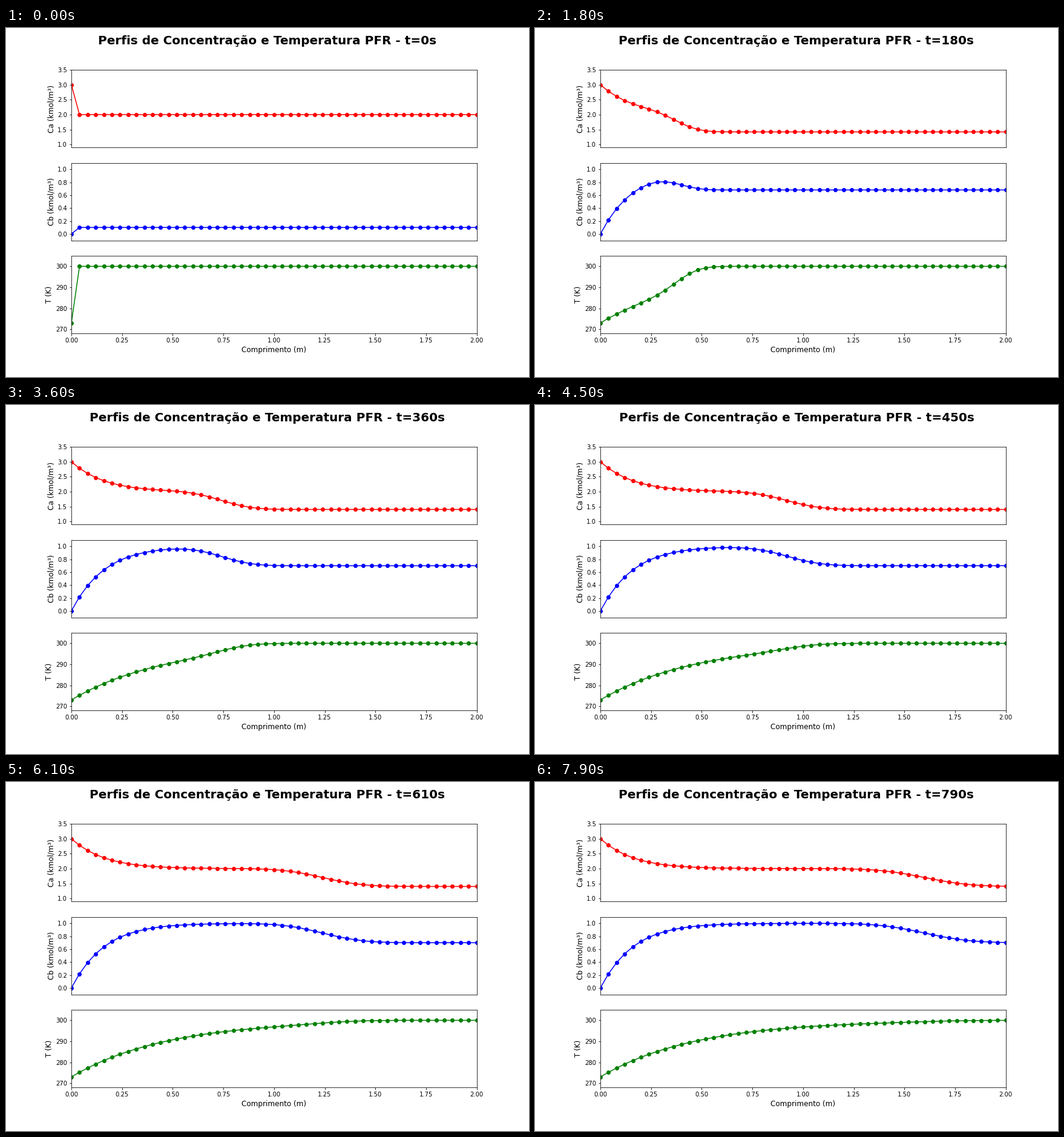
Write a matplotlib script that moves like this. It is 864x576 px and loops after 8000 ms.

```python
import numpy as np
import matplotlib.pyplot as plt
from matplotlib.animation import FuncAnimation

plt.rcParams["font.family"] = "DejaVu Sans"

FRAMES, DT = 80, 10      # one frame per time step of 10 s
NODES, LENGTH = 51, 2.0
COURANT = 0.5            # v * dt / dx
JACKET_T = 300.0
KEEP, CARRY = 0.47, 0.4866   # per-step weights of the excess temperature
RATE, ACT = 0.1735, 720.0    # kinetics at 300 K and E/R


def upwind(c):
    return COURANT * (c[:-1] - c[1:])


def step(ca, cb, temp):
    """Advance the reversible reaction A <-> B by one explicit step."""
    k = RATE * np.exp(ACT * (1 / JACKET_T - 1 / temp[1:]))
    r = k * (ca[1:] - 2 * cb[1:]) / 3
    heat = temp - JACKET_T
    na, nb, nt = ca.copy(), cb.copy(), temp.copy()
    na[1:] += upwind(ca) - r
    nb[1:] += upwind(cb) + r
    nt[1:] = JACKET_T + KEEP * heat[1:] + CARRY * heat[:-1]
    return na, nb, nt


def simulate():
    state = tuple(np.full(NODES, v) for v in (2.0, 0.1, JACKET_T))
    for profile, inlet in zip(state, (3.0, 0.0, 273.0)):
        profile[0] = inlet
    states = [state]
    for _ in range(FRAMES - 1):
        states.append(step(*states[-1]))
    return states


states = simulate()
x = np.linspace(0, LENGTH, NODES)

fig, axes = plt.subplots(3, 1, figsize=(12, 8), dpi=72)
fig.subplots_adjust(left=0.125, right=0.9, bottom=0.125, top=0.88, hspace=0.2)
title = fig.suptitle("", fontsize=20, fontweight="bold")

panels = [
    ("Ca (kmol/m³)", "r", (0.9, 3.5), np.arange(1, 3.6, 0.5)),
    ("Cb (kmol/m³)", "b", (-0.1, 1.1), np.arange(0, 1.1, 0.2)),
    ("T (K)", "g", (268, 305), np.arange(270, 301, 10)),
]
lines = []
for ax, (label, color, ylim, ticks) in zip(axes, panels):
    line, = ax.plot(x, np.zeros(NODES), color + "-o", lw=1.5, ms=6)
    lines.append(line)
    ax.set_xlim(0, LENGTH)
    ax.set_ylim(*ylim)
    ax.set_yticks(ticks)
    ax.set_ylabel(label, fontsize=12)
    ax.set_xticks([])
axes[-1].set_xticks(np.arange(0, 2.01, 0.25))
axes[-1].set_xlabel("Comprimento (m)", fontsize=12)


def update(i):
    title.set_text(f"Perfis de Concentração e Temperatura PFR - t={i * DT}s")
    for line, profile in zip(lines, states[i]):
        line.set_ydata(profile)
    return [title, *lines]


anim = FuncAnimation(fig, update, frames=FRAMES, interval=100,
                     repeat=True, repeat_delay=0)
plt.show()
```
